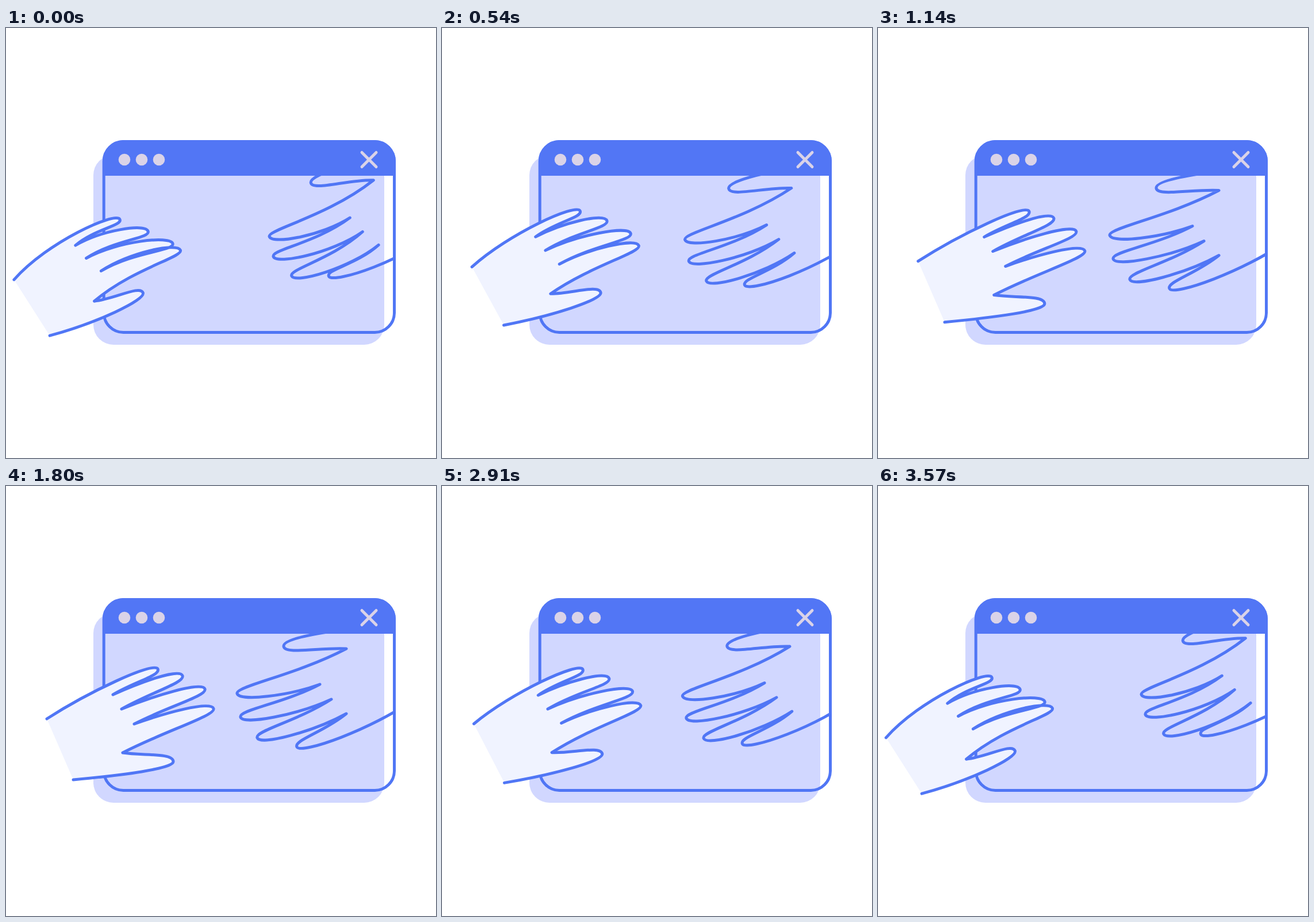
An HTML page for the animation above (5.4 s loop, 748 px wide and 748 px high).

```html
<!DOCTYPE html>
<html lang="en">
<head>
<meta charset="utf-8">
<title>Hands reaching through a window</title>
<style>
  html, body { margin: 0; width: 100%; height: 100%; overflow: hidden; background: #fff; }
  svg { display: block; width: 100%; height: 100%; }
  .line { fill: none; stroke: #5076f5; stroke-width: 5; stroke-linecap: round; stroke-linejoin: round; }
  .bar { fill: #5276f5; }
  .knob { fill: #dad3e8; }
  .cross { stroke: #dad3e8; }
  #left { fill: #f0f3ff; }
</style>
</head>
<body>
<svg viewBox="0 0 748 748">
  <clipPath id="pane"><rect x="170" y="255" width="505" height="275"/></clipPath>
  <rect x="152" y="221" width="506" height="330" rx="35" fill="#d1d7ff"/>
  <g clip-path="url(#pane)"><path id="right" class="line"/></g>
  <rect class="line" x="170.200" y="197.500" width="505.300" height="332" rx="34"/>
  <path class="bar" d="M168 257V232A37 37 0 0 1 205 195H641A37 37 0 0 1 678 232V257Z"/>
  <g class="knob">
    <circle cx="206" cy="229" r="10.300"/>
    <circle cx="236" cy="229" r="10.300"/>
    <circle cx="266" cy="229" r="10.300"/>
  </g>
  <path class="line cross" d="M619 216.500L644 241.500M644 216.500L619 241.500"/>
  <path id="left" class="line"/>
</svg>
<script>
const LOOP = 5400, TURN = 1800, END = 3570, STEP = 30;

// Open hand, little finger to thumb. roots: wrist, gaps between fingers, wrist.
// turn, shift and bend describe how the withdrawn hand differs from the open one.
const hands = [
  {
    id: "left",
    roots: [[71, 405], [186, 363], [201, 388], [223, 414], [203, 464], [117, 511]],
    tips: [[264, 318], [307, 330], [346, 353], [361, 387], [291, 479]],
    bend: [5, 14, 14, 5, -7],
    bow: 0.035, pivot: [94, 458], turn: -9.1, shift: [-49, 28.5]
  },
  {
    id: "right",
    roots: [[710, 371], [592, 396], [566, 371], [546, 345], [592, 283], [600, 248]],
    tips: [[506, 454], [437, 438], [408, 402], [402, 361], [483, 279]],
    bend: [4, 0, 0, -2, 0],
    bow: 0.07, pivot: [630, 192], turn: -4.5, shift: [40, -21]
  }
];
const CURLED_BOW = 0.11;

const mix = (a, b, k) => a + (b - a) * k;
const between = (p, q, k) => [mix(p[0], q[0], k), mix(p[1], q[1], k)];
const along = (p, dir, k) => [p[0] + dir[0] * k, p[1] + dir[1] * k];
const dist = (p, q) => Math.hypot(q[0] - p[0], q[1] - p[1]);

function rotate([x, y], [cx, cy], degrees) {
  const a = degrees * Math.PI / 180, c = Math.cos(a), s = Math.sin(a);
  return [cx + (x - cx) * c - (y - cy) * s, cy + (x - cx) * s + (y - cy) * c];
}

// Two curves per finger: outer edge up to the tip, inner edge back down.
function finger(from, to, openTip, bend, bow) {
  const base = between(from, to, 0.5);
  const tip = rotate(openTip, base, bend);
  const len = dist(base, tip);
  const out = [(tip[1] - base[1]) / len, (base[0] - tip[0]) / len];
  return "C" + [
    along(between(from, tip, 0.4), out, (bow + 0.025) * dist(from, tip)),
    along(tip, out, 15), tip, along(tip, out, -13),
    along(between(to, tip, 0.48), out, (bow - 0.025) * dist(to, tip)),
    to
  ].join(" ");
}

function drawHand({ id, roots, tips, bend, bow, pivot, turn, shift }, open, reach) {
  const curl = 1 - open, away = 1 - reach;
  const bowNow = mix(bow, CURLED_BOW, curl);
  const fingers = tips.map((tip, i) =>
    finger(roots[i], roots[i + 1], tip, bend[i] * curl, i < 4 ? bowNow : -bowNow / 2));
  const path = document.getElementById(id);
  path.setAttribute("d", `M${roots[0]}${fingers.join("")}`);
  path.setAttribute("transform",
    `translate(${shift[0] * away} ${shift[1] * away}) rotate(${turn * curl} ${pivot})`);
}

const clamp = p => Math.min(Math.max(p, 0), 1);
const easeOut = p => 1 - (1 - clamp(p)) ** 3;
const smooth = p => clamp(p) ** 2 * (3 - 2 * clamp(p));

function draw(now) {
  const t = Math.floor(now % LOOP / STEP) * STEP;
  const rising = t < TURN;
  const run = rising ? t : END - t;
  const open = smooth(run / 1200);
  const reach = easeOut(run / (rising ? 1600 : 1770));
  for (const hand of hands) drawHand(hand, open, reach);
}

const start = performance.now();
function tick() {
  draw(performance.now() - start);
  requestAnimationFrame(tick);
}
tick();
</script>
</body>
</html>
```
